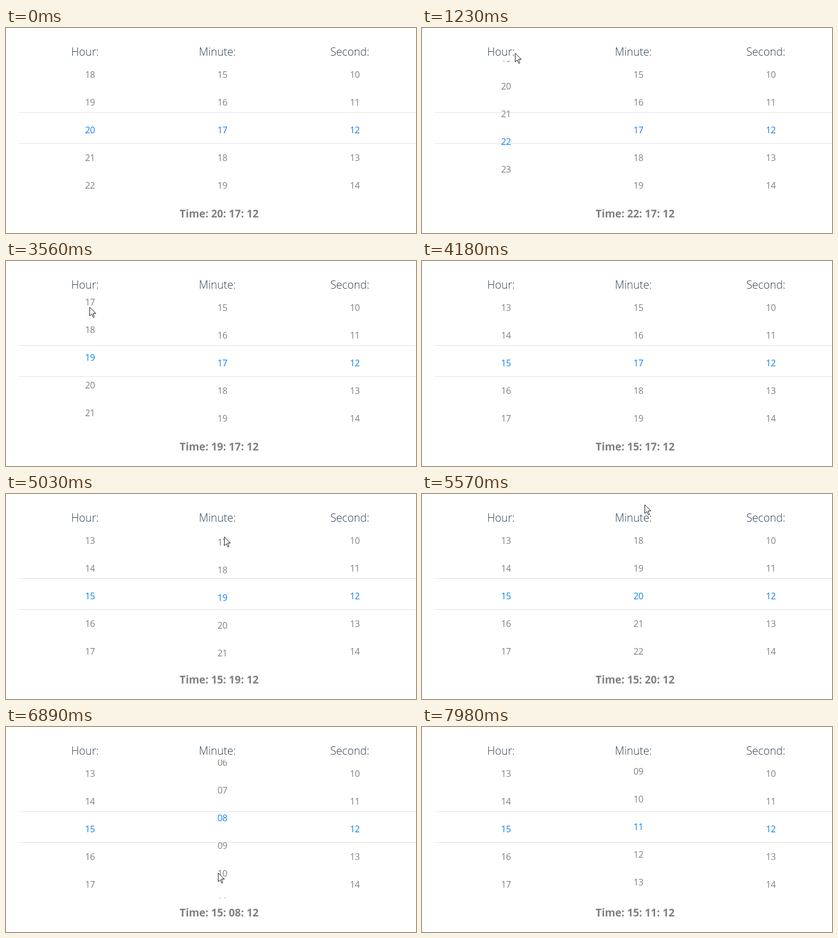
Animation of 737x370 px, one loop 8000 ms. Source, as an HTML page:

```html
<!DOCTYPE html>
<html lang="en">
<head>
<meta charset="utf-8">
<title>Time picker</title>
<style>
  html, body { margin: 0; width: 100%; height: 100%; overflow: hidden; background: #fff; }
  svg { display: block; width: 737px; height: 370px; font-family: "Open Sans", sans-serif; }
  text { text-anchor: middle; }
  .title { font-size: 19.6px; font-weight: 350; fill: #2c3e50; }
  .wheel { font-size: 16px; letter-spacing: -.4px; fill: #808080; }
  .wheel .on { fill: #1080f5; }
  #time { font-size: 18.9px; font-weight: 700; fill: #808080; }
</style>
</head>
<body>
<svg viewBox="0 0 737 370">
  <clipPath id="window"><rect y="59" width="737" height="250"/></clipPath>
  <path d="M23 152.5H737M23 208.5H737" stroke="#e2e2e2"/>
  <g id="wheels" clip-path="url(#window)"></g>
  <text id="time" x="383" y="342"></text>
  <path id="cursor" d="M.5 .5V16.2L4.2 12.8 6.7 18.5H8.6V17.5L6.5 11.5H11.5Z" fill="#fff" stroke="#1c1c30"/>
</svg>
<script>
const LOOP = 8000, ROW = 50, BASELINE = 190, LINGER = 200;

// Each drag turns its wheel by some rows, easing in and out
const hourDrags = [
  { start: 440, end: 1562, rows: 2 },
  { start: 2870, end: 3240, rows: -2 },
  { start: 3350, end: 4180, rows: -5 }
];
const minuteDrags = [
  { start: 4490, end: 5390, rows: 3 },
  { start: 5692, end: 7039, rows: -12 },
  { start: 7050, end: 7590, rows: 4 },
  { start: 7790, end: 8020, rows: -1 }
];

// The pointer shows during a stroke and lingers briefly after it
const strokes = [
  { start: 440, end: 1230, from: [150, 124], to: [167, 45] },
  { start: 1790, end: 2170, from: [157, 16], to: [137, 87] },
  { start: 2320, end: 3560, from: [137, 87], to: [150, 83] },
  { start: 3600, end: 3980, from: [150, 83], to: [152, 290] },
  { start: 4250, end: 4340, from: [341, 154], to: [390, 154] },
  { start: 4490, end: 5338, from: [390, 154], to: [393, 44] },
  { start: 5510, end: 6380, from: [400, 14], to: [418, 352] },
  { start: 6420, end: 6890, from: [390, 90], to: [381, 263] },
  { start: 6980, end: 7400, from: [381, 263], to: [415, 16] }
];

const $ = id => document.getElementById(id);
const pad = n => String(n).padStart(2, "0");

function progress({ start, end }, t) {
  const x = Math.min(1, Math.max(0, (t - start) / (end - start)));
  return x * x * (3 - 2 * x);
}

function svg(parent, name, attributes, text = "") {
  const el = document.createElementNS("http://www.w3.org/2000/svg", name);
  for (const key in attributes) el.setAttribute(key, attributes[key]);
  el.textContent = text;
  return parent.appendChild(el);
}

function makeWheel(title, x, count, first, drags) {
  svg($("time").parentNode, "text", { class: "title", x: x - 9, y: 50 }, title);
  const group = svg($("wheels"), "g", { class: "wheel" });
  const rows = Array.from({ length: count }, (_, i) =>
    svg(group, "text", { x, y: BASELINE + i * ROW }, pad(i)));
  return t => {
    const position = drags.reduce((sum, drag) => sum + drag.rows * progress(drag, t), first);
    const value = Math.round(position);
    group.setAttribute("transform", `translate(0 ${-position * ROW})`);
    rows.forEach((row, i) => row.classList.toggle("on", i === value));
    return pad(value);
  };
}

const wheels = [
  makeWheel("Hour:", 151, 24, 20, hourDrags),
  makeWheel("Minute:", 389, 60, 17, minuteDrags),
  makeWheel("Second:", 627, 60, 12, [])
];
$("cursor").parentNode.append($("cursor"));

function draw(t) {
  $("time").textContent = "Time: " + wheels.map(turn => turn(t)).join(": ");

  const stroke = strokes.findLast(s => s.start <= t);
  const visible = stroke && t < stroke.end + LINGER;
  $("cursor").style.display = visible ? "" : "none";
  if (visible) {
    const p = progress(stroke, t);
    const [x, y] = stroke.from.map((a, i) => Math.round(a + (stroke.to[i] - a) * p));
    $("cursor").setAttribute("transform", `translate(${x} ${y})`);
  }
}

const began = performance.now();
function tick() {
  draw((performance.now() - began) % LOOP);
  requestAnimationFrame(tick);
}
tick();
</script>
</body>
</html>
```
